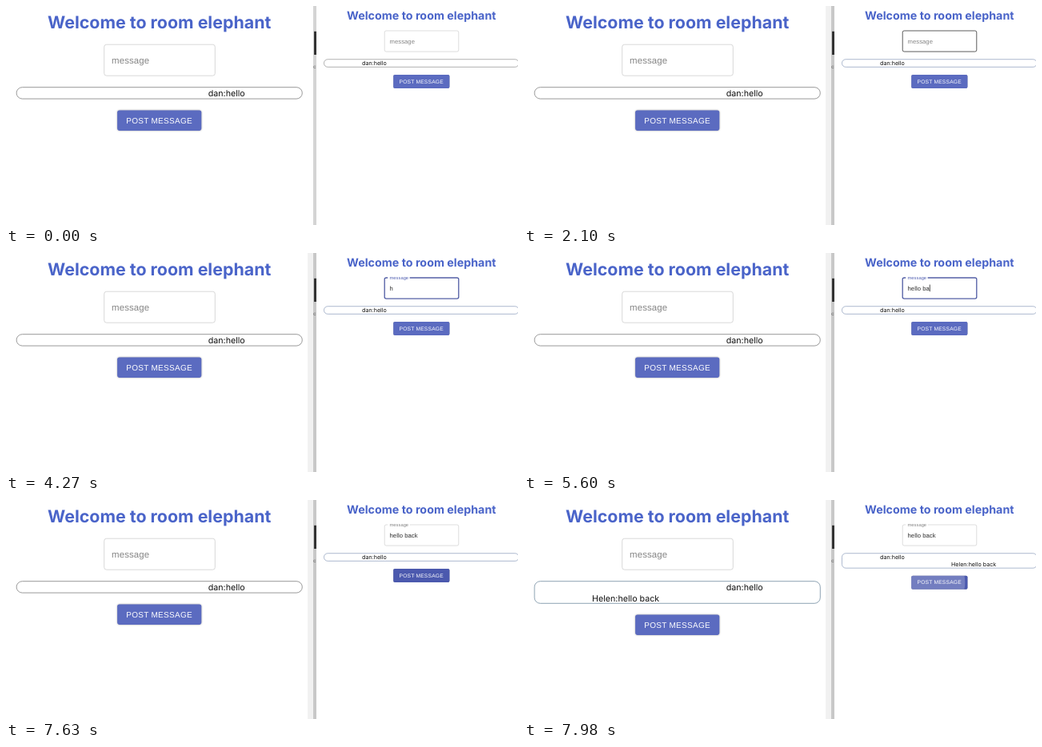
Write an HTML page that moves like this. It is 640 px wide and 274 px high and loops after 8 s.

```html
<!DOCTYPE html>
<html lang="en">
<head>
<meta charset="utf-8">
<title>Chat room</title>
<style>
  html, body { margin: 0; width: 100%; height: 100%; overflow: hidden; background: #fff; }
  svg { display: block; width: 640px; height: 274px; }
  text { white-space: pre; text-rendering: geometricPrecision; }
  .title { font: 700 21.4px Inter, sans-serif; fill: #4a64c9; text-anchor: middle; }
  .chat { font: 400 10.7px Inter, sans-serif; fill: #111; }
  .label, .value { font: 400 11.44px "Liberation Sans", Arial, sans-serif; letter-spacing: .107px; }
  .value { fill: #2a2a2a; }
  .cap { font: 400 10px "Liberation Sans", Arial, sans-serif; letter-spacing: .286px; fill: #fff; }
  .button { filter: drop-shadow(0 .9px .9px rgba(0, 0, 0, .34)); }
</style>
</head>
<body>
<svg id="stage" viewBox="0 0 640 274"></svg>
<script>
const LOOP = 8000;
const HOVER = 2030, FOCUS = 2800, BLUR = 7560, REPLY = 7840, ARRIVE = 7980;
const TYPED = [
  [0, ''], [3780, 'h'], [4340, 'he'], [4480, 'hel'], [4620, 'hell'], [4830, 'hello'],
  [5110, 'hello '], [5390, 'hello b'], [5530, 'hello ba'], [5740, 'hello bac'], [6020, 'hello back']
];
const CARET = [[0, 0], [FOCUS, 1], [3290, 0], [3780, 1], [4270, 0], [4340, 1], [6580, 0], [7070, 1], [BLUR, 0]];

// Both windows share one layout, centred on x = 0.
const pane = (id, place, half, firstX, replyX) => `
  <g id="${id}" transform="${place}">
    <text class="title" y="27.6">Welcome to room elephant</text>
    <rect class="field" x="-69" y="48.2" width="138.6" height="39" rx="3" fill="#fff"/>
    <rect class="notch" x="-63" y="46" width="41" height="4" fill="#fff"/>
    <text class="label">message</text>
    <text class="value" x="-59.6" y="71.6"></text>
    <rect class="caret" y="61" width="1.2" height="13" fill="#222"/>
    <rect class="list" x="${-half}" y="101.7" width="${2 * half}" fill="none"/>
    <text class="chat" x="${firstX}" y="113.2">dan:hello</text>
    <text class="chat reply" x="${replyX}" y="126.5">Helen:hello back</text>
    <g class="action">
      <rect class="button" x="-52.6" y="130.5" width="105.2" height="25.4" rx="2.8"/>
      <circle class="ripple" cx="-13.8" cy="143" fill="#fff" clip-path="url(#face)"/>
      <text class="cap" x="-41.5" y="146.6">POST MESSAGE</text>
    </g>
  </g>`;

const stage = document.getElementById('stage');
stage.innerHTML = `
  <defs>
    <clipPath id="face"><rect x="-52.6" y="130.5" width="105.2" height="25.4" rx="2.8"/></clipPath>
    <clipPath id="slit"><rect x="384" y="0" width="4" height="274"/></clipPath>
  </defs>
  <rect width="640" height="274" fill="#fff"/>
  ${pane('left', 'translate(191.7 0)', 178.6, 61, -106.7)}
  <rect id="track" x="377" width="7" height="274" fill="#f1f1f1"/>
  <g clip-path="url(#slit)">
    <rect id="gap" x="384" width="4" height="274"/>
    <rect x="385" y="31.8" width="3" height="29.2" fill="#333"/>
    <text x="384" y="78" font-family="Inter, sans-serif" font-size="6" fill="#555">cl</text>
  </g>
  ${pane('right', 'translate(519.3 -1.2) scale(.668)', 182.4, -111.2, 22)}`;

const parts = id => (name, attrs) => {
  const el = stage.querySelector(`#${id} .${name}`);
  for (const key in attrs) el.setAttribute(key, attrs[key]);
  return el;
};
const left = parts('left'), right = parts('right');
const track = document.getElementById('track'), gap = document.getElementById('gap');

const clamp = v => Math.min(1, Math.max(0, v));
const ramp = (t, start, span) => clamp((t - start) / span);
const at = (table, t) => table.filter(row => row[0] <= t).pop()[1];
const mix = (a, b, k) => a + (b - a) * k;
const blend = (a, b, k) => `rgb(${a.map((v, i) => Math.round(mix(v, b[i], k)))})`;

// cubic-bezier(x1, 0, x2, 1)
function ease(p, x1, x2) {
  let lo = 0, hi = 1, u = p;
  for (let i = 0; i < 18; i++) {
    u = (lo + hi) / 2;
    const x = 3 * (1 - u) ** 2 * u * x1 + 3 * (1 - u) * u * u * x2 + u ** 3;
    if (x < p) lo = u; else hi = u;
  }
  return u * u * (3 - 2 * u);
}

function drawPane(part, s) {
  part('field', { stroke: s.edge, 'stroke-width': s.weight });
  part('notch', { width: 41 * s.lift, opacity: s.lift > 0 ? 1 : 0 });
  part('label', {
    transform: `translate(-59.6 ${mix(71.6, 51, s.lift)}) scale(${mix(1, .75, s.lift)})`,
    fill: s.ink
  });
  const value = part('value', {});
  if (value.textContent !== s.text) value.textContent = s.text;
  const end = s.text ? value.getComputedTextLength() : 0;
  part('caret', { x: -59.6 + end, opacity: s.caret });
  part('list', { height: s.grown ? 27.6 : 14.4, rx: 7.2, stroke: s.rim, 'stroke-width': 1 });
  part('reply', { opacity: s.grown ? 1 : 0 });
  part('action', { transform: `translate(0 ${s.grown ? 13 : 0})` });
  part('button', { fill: s.fill });
  part('ripple', { r: s.ripple, opacity: s.glow });
}

function render(t) {
  const show = ramp(t, 1750, 210);
  track.setAttribute('opacity', show);
  gap.setAttribute('fill', blend([212, 212, 212], [200, 200, 200], show));

  const idle = {
    edge: '#d8d8d8', weight: 1, lift: 0, ink: '#858585', text: '', caret: 0,
    fill: '#5b6bc0', ripple: 0, glow: 0
  };
  const got = t >= ARRIVE;
  drawPane(left, { ...idle, grown: got, rim: got ? '#8ea3b3' : '#999' });

  const focused = t >= FOCUS && t < BLUR;
  const hovered = t >= HOVER && t < FOCUS;
  const press = ramp(t, BLUR, 550);
  drawPane(right, {
    edge: focused ? '#5460a6' : hovered ? '#444' : '#d8d8d8',
    weight: focused ? 2 : 1.3,
    lift: ease(ramp(t, FOCUS, 200), 0, .2),
    ink: focused ? '#5664b4' : '#858585',
    text: at(TYPED, t),
    caret: at(CARET, t),
    grown: t >= REPLY,
    rim: blend([140, 140, 140], [132, 150, 184], show),
    fill: blend([91, 107, 192], [75, 89, 174], ramp(t, 6860, 250)),
    ripple: 64 * ease(press, .4, .2),
    glow: .22 * ramp(t, BLUR, 200)
  });
}

const start = performance.now();
function tick() {
  render((performance.now() - start) % LOOP);
  requestAnimationFrame(tick);
}
tick();
</script>
</body>
</html>
```
